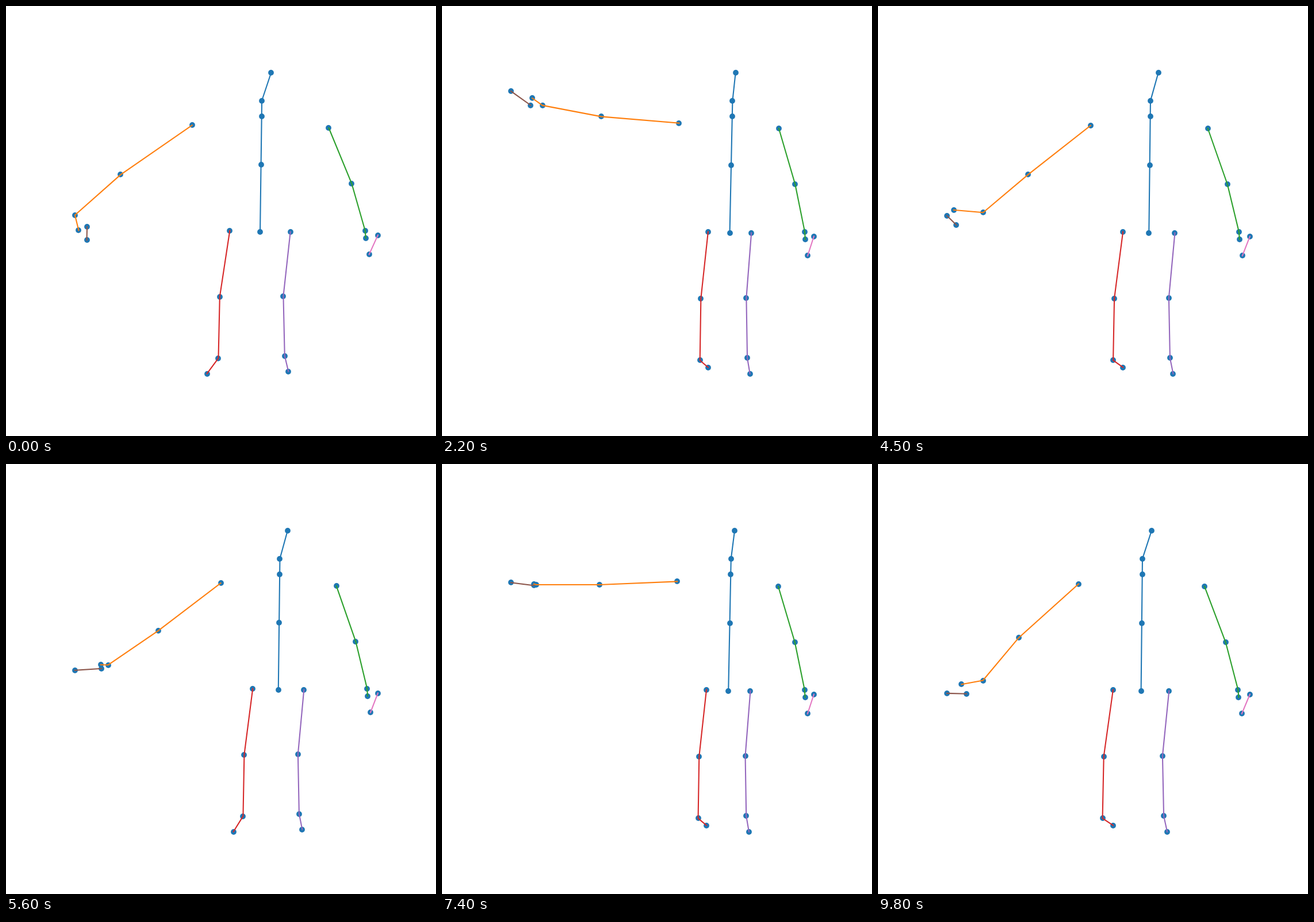
An HTML page with a canvas for the animation above (9900 ms loop, 748x748 px).

```html
<!DOCTYPE html>
<html lang="en">
<head>
<meta charset="utf-8">
<title>Skeleton motion</title>
<style>
html, body { margin: 0; height: 100%; overflow: hidden; background: #fff; }
canvas { display: block; }
</style>
</head>
<body>
<canvas id="stage" width="748" height="748"></canvas>
<script>
const ctx = document.getElementById('stage').getContext('2d');
const LOOP = 9900, STEP = 100, BLUE = '#1f77b4';

// Raised arm: time, angles below horizontal (upper arm, forearm, hand),
// distance of the fingertip and of the palm from the wrist
const gesture = [
  [0, 39, 46, 112, 47, 27],
  [1300, 2, 1, -17, 78, 38],
  [3100, -10, -19, -24, 62, 11],
  [4500, 38, 40, 5, 63, 51],
  [5600, 37, 34, 9, 59, 13],
  [7400, 2, 0, -4, 52, 5],
  [9800, 44, 52, 21, 62, 35],
];

// Still parts, with x measured from the pelvis
const restingArm = [[102, 212.5], [136, 309], [156, 391], [157, 404]];
const restingHand = [[162, 432.5], [175, 399]];
const rightLeg = [[-45, 391], [-60, 506], [-62, 613]];
const leftLeg = [[45, 393], [34.5, 505], [36.5, 609], [42, 636]];

const smooth = u => u * u * (3 - 2 * u);

function armAt(time) {
  const next = Math.max(1, gesture.findIndex(key => key[0] >= time));
  const a = gesture[next - 1], b = gesture[next];
  const u = smooth((time - a[0]) / (b[0] - a[0]));
  return a.map((v, i) => v + (b[i] - v) * u);
}

// Point at a distance to the left, turned down by the angle
function extend([x, y], length, degrees) {
  const angle = degrees * Math.PI / 180;
  return [x - length * Math.cos(angle), y + length * Math.sin(angle)];
}

function limbsAt(time) {
  const [, upper, fore, hand, reach, palm] = armAt(time);
  const lift = 1 - upper / 40;

  const spine = [393, 276, 192, 165].map(y => {
    const height = (393 - y) / 228;
    return [(2.5 + 3 * lift) * height, y];
  });
  spine.push([spine[3][0] + 14 - 7 * lift, 116.5]);

  // The arm looks shorter the further it hangs towards the viewer
  const shoulder = [-101 - 4 * lift, 208 - 4 * lift];
  const elbow = extend(shoulder, 160 - 0.6 * upper, upper);
  const wrist = extend(elbow, 130 - 0.7 * Math.abs(fore), fore);
  const arm = [shoulder, elbow, wrist, extend(wrist, palm, hand - 10)];
  const fingers = [extend(wrist, reach, hand), extend(wrist, palm, hand + 20)];

  const toe = time % 5600 > 1700 ? [-45, 625] : [-79, 640];

  return [
    [BLUE, spine],
    ['#ff7f0e', arm],
    ['#2ca02c', restingArm],
    ['#d62728', [...rightLeg, toe]],
    ['#9467bd', leftLeg],
    ['#8c564b', fingers],
    ['#e377c2', restingHand],
  ];
}

// Map the extremes of the values onto lo and hi
function fit(values, lo, hi) {
  const min = Math.min(...values), max = Math.max(...values);
  return v => lo + (v - min) / (max - min) * (hi - lo);
}

function draw(time) {
  const limbs = limbsAt(time);
  const joints = limbs.flatMap(([, points]) => points);
  const toX = fit(joints.map(p => p[0]), 119.9, 646.9);
  const toY = fit(joints.map(p => p[1]), 116, 639.6);

  ctx.fillStyle = '#fff';
  ctx.fillRect(0, 0, 748, 748);

  ctx.fillStyle = BLUE;
  for (const [x, y] of joints) {
    ctx.beginPath();
    ctx.arc(Math.round(toX(x)), Math.round(toY(y)), 4.9, 0, 2 * Math.PI);
    ctx.fill();
  }

  ctx.lineWidth = 2.08;
  ctx.lineCap = 'square';
  ctx.lineJoin = 'round';
  for (const [color, points] of limbs) {
    ctx.strokeStyle = color;
    ctx.beginPath();
    for (const [x, y] of points) ctx.lineTo(toX(x), toY(y));
    ctx.stroke();
  }
}

function tick() {
  const time = performance.now() % LOOP;
  draw(Math.floor(time / STEP) * STEP);
  requestAnimationFrame(tick);
}
tick();
</script>
</body>
</html>
```
